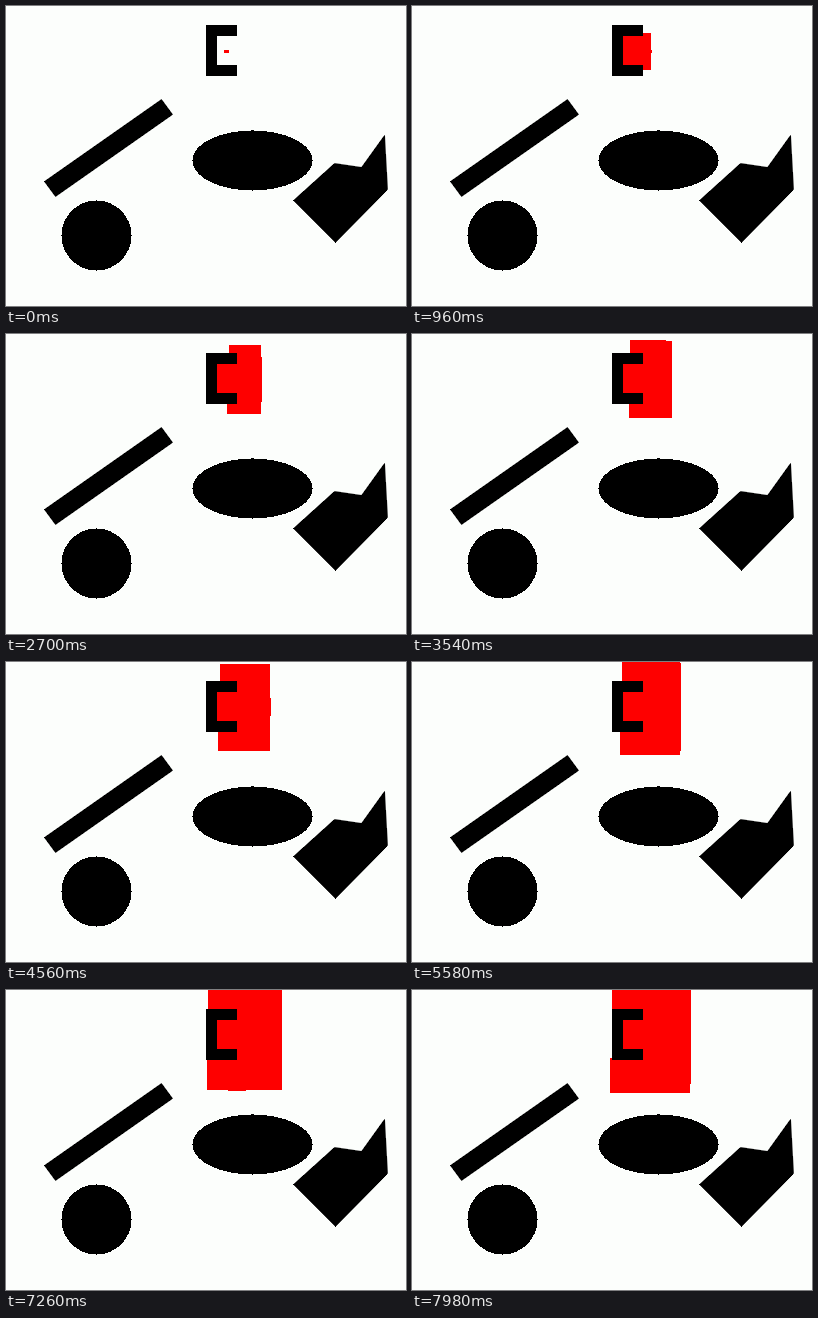
Write an HTML page with a canvas that moves like this. It is 400 by 300 pixels and loops after 8000 ms.

```html
<!DOCTYPE html>
<html lang="en">
<head>
<meta charset="utf-8">
<title>Flood fill</title>
<style>
  html, body { margin: 0; width: 100%; height: 100%; overflow: hidden; background: #fcfefc; }
  canvas, svg { position: absolute; left: 0; top: 0; width: 400px; height: 300px; }
</style>
</head>
<body>
<canvas id="fill" width="400" height="300"></canvas>
<svg viewBox="0 0 400 300" shape-rendering="crispEdges">
  <path d="M200 19H231V30H211V59H231V70H200Z"/>
  <circle cx="90.5" cy="229.5" r="35.05"/>
  <ellipse cx="246.5" cy="154.5" rx="60.05" ry="30.05"/>
  <g transform="translate(.5 .5)" stroke="#000" stroke-width=".8" stroke-linejoin="round">
    <path d="M155 93L166 108L49 190L38 175Z"/>
    <path d="M287 194L328 157L355 161L378 129L381 183L329 236Z"/>
  </g>
</svg>
<script>
const W = 400, H = 300, LOOP = 8000, STEP = 60, FIRST = 15, RATE = 54;
const SEED = [220, 45];
const ctx = document.getElementById('fill').getContext('2d');
ctx.fillStyle = '#fe0000';

const inside = (x, y, l, t, r, b) => x >= l && x < r && y >= t && y < b;
const isWall = (x, y) => inside(x, y, 200, 19, 231, 70) && !inside(x, y, 211, 30, 231, 59);

// Breadth-first fill over eight neighbours: sides first, then corners.
function fillOrder(limit) {
  const steps = [[-1, 0], [1, 0], [0, -1], [0, 1], [-1, -1], [-1, 1], [1, -1], [1, 1]];
  const seen = new Uint8Array(W * H);
  const queue = [SEED];
  seen[SEED[1] * W + SEED[0]] = 1;
  for (let head = 0; queue.length < limit; head++) {
    const [x, y] = queue[head];
    for (const [dx, dy] of steps) {
      const nx = x + dx, ny = y + dy, key = ny * W + nx;
      if (!inside(nx, ny, 0, 0, W, H) || seen[key] || isWall(nx, ny)) continue;
      seen[key] = 1;
      queue.push([nx, ny]);
    }
  }
  return queue;
}

const order = fillOrder(FIRST + RATE * Math.ceil(LOOP / STEP));
const start = performance.now();
let painted = 0;

function draw() {
  const time = Math.max(0, performance.now() - start) % LOOP;
  const count = FIRST + RATE * Math.floor(time / STEP);
  if (count < painted) {
    ctx.clearRect(0, 0, W, H);
    painted = 0;
  }
  for (; painted < count; painted++) ctx.fillRect(...order[painted], 1, 1);
  requestAnimationFrame(draw);
}
draw();
</script>
</body>
</html>
```
